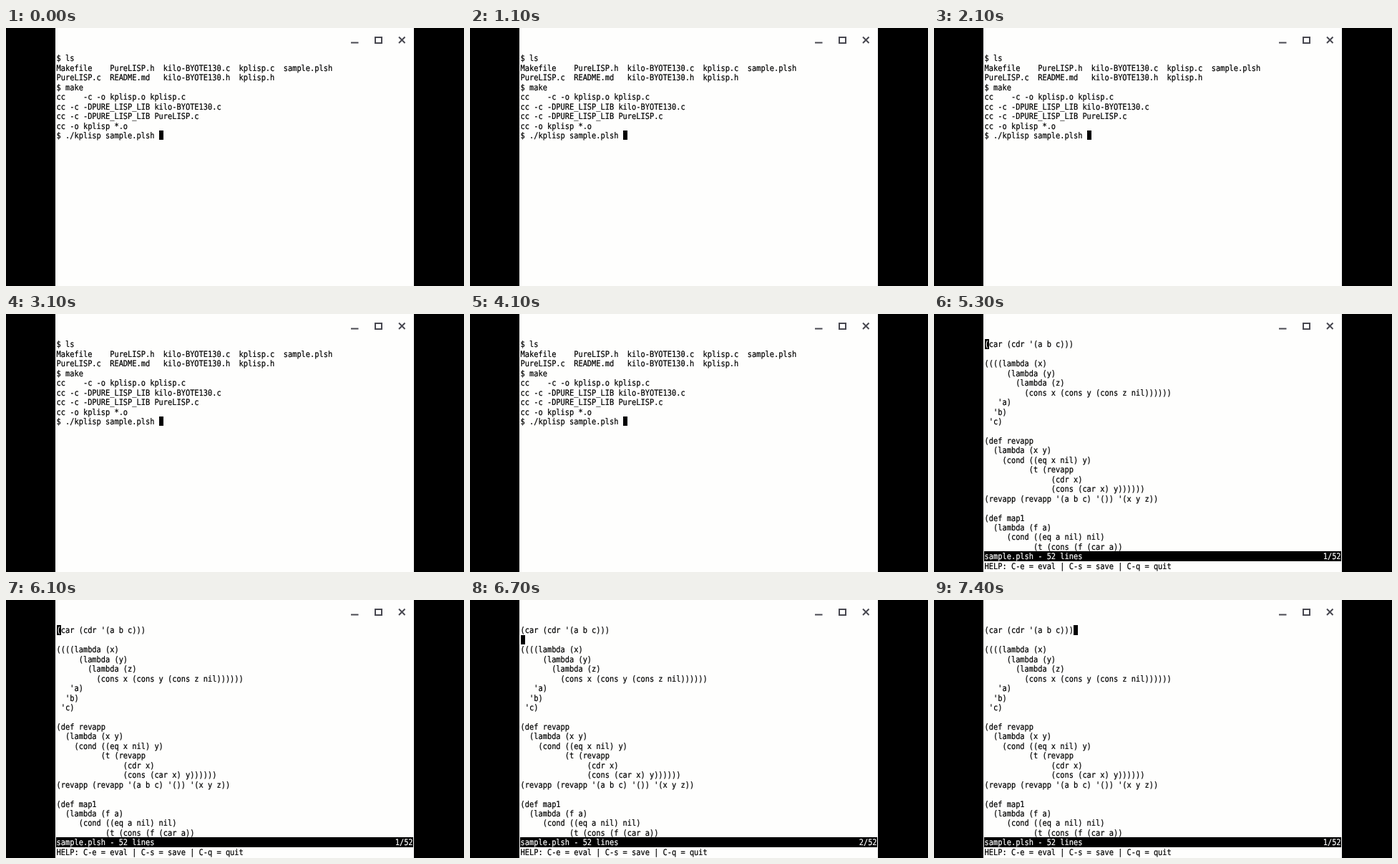
Recreate the animation shown at these times as an HTML page. Size 640 by 360 pixels, loop 8 s.

```html
<!DOCTYPE html>
<html lang="en">
<head>
<meta charset="utf-8">
<title>Terminal session</title>
<style>
  html, body { margin: 0; width: 100%; height: 100%; overflow: hidden; background: #000; }
  svg { display: block; width: 100vw; height: 100vh; }
  rect { shape-rendering: crispEdges; }
  text {
    font: 10.34px "DejaVu Sans Mono", monospace;
    white-space: pre;
    text-rendering: geometricPrecision;
    stroke-width: .2px;
  }
</style>
</head>
<body>
<svg id="stage" viewBox="0 0 640 360">
  <rect width="640" height="360"/>
  <rect x="69" width="501" height="360" fill="#fefefd"/>
  <g fill="none" stroke="#484850" stroke-width="2">
    <path d="M482 20.5h10.5"/>
    <rect x="516" y="12.5" width="8.5" height="8"/>
    <path d="M549 12.5l8.5 8.5m0-8.5l-8.5 8.5"/>
  </g>
</svg>
<script>
const LOOP = 8000;
const LEFT = 70.6, TOP = 35.2, CELL_W = 6.225, CELL_H = 13.45, BASELINE = 11.2;
const TALL = 1.13; // the terminal face is taller than the fallback one

const shell = String.raw`$ ls
Makefile    PureLISP.h  kilo-BYOTE130.c  kplisp.c  sample.plsh
PureLISP.c  README.md   kilo-BYOTE130.h  kplisp.h
$ make
cc    -c -o kplisp.o kplisp.c
cc -c -DPURE_LISP_LIB kilo-BYOTE130.c
cc -c -DPURE_LISP_LIB PureLISP.c
cc -o kplisp *.o
$ ./kplisp sample.plsh`.split("\n");

const buffer = String.raw`(car (cdr '(a b c)))

((((lambda (x)
     (lambda (y)
       (lambda (z)
         (cons x (cons y (cons z nil))))))
   'a)
  'b)
 'c)

(def revapp
  (lambda (x y)
    (cond ((eq x nil) y)
          (t (revapp
               (cdr x)
               (cons (car x) y))))))
(revapp (revapp '(a b c) '()) '(x y z))

(def map1
  (lambda (f a)
     (cond ((eq a nil) nil)
           (t (cons (f (car a))`.split("\n");

const STATUS_ROW = 22, HELP_ROW = 23, COLUMNS = 80;

// Each step holds until the next one starts.
const steps = [
  { at: 0, editor: false, row: 8, col: 23 },
  { at: 5300, editor: true, row: 0, col: 0 },
  { at: 6700, editor: true, row: 1, col: 0 },
  { at: 7100, editor: true, row: 0, col: 20 },
];

const stage = document.getElementById("stage");

function add(parent, tag, attrs = {}) {
  const node = document.createElementNS("http://www.w3.org/2000/svg", tag);
  for (const [key, value] of Object.entries(attrs)) node.setAttribute(key, value);
  return parent.appendChild(node);
}

const cellX = col => LEFT + col * CELL_W;
const cellY = row => TOP + row * CELL_H;

function place(node, row, col) {
  node.setAttribute("transform",
    `translate(${cellX(col)} ${cellY(row) + BASELINE}) scale(1 ${TALL})`);
}

function write(parent, string, row, col = 0, color = "#000") {
  const node = add(parent, "text", { fill: color, stroke: color });
  node.textContent = string;
  place(node, row, col);
  return node;
}

const shellView = add(stage, "g");
shell.forEach((line, row) => write(shellView, line, row));

const editorView = add(stage, "g");
buffer.forEach((line, row) => write(editorView, line, row));
add(editorView, "rect", { x: 70, y: cellY(STATUS_ROW), width: 499, height: CELL_H });
write(editorView, "sample.plsh - 52 lines", STATUS_ROW, 0, "#fff");
const position = write(editorView, "", STATUS_ROW, COLUMNS - 4, "#fff");
write(editorView, "HELP: C-e = eval | C-s = save | C-q = quit", HELP_ROW);

const cursor = add(stage, "rect", { width: CELL_W, height: CELL_H });
const underCursor = write(stage, "", 0, 0, "#fff");

function render(time) {
  const { editor, row, col } = steps.findLast(step => step.at <= time);
  shellView.style.display = editor ? "none" : "";
  editorView.style.display = editor ? "" : "none";
  position.textContent = `${row + 1}/52`;
  cursor.setAttribute("x", cellX(col));
  cursor.setAttribute("y", cellY(row));
  underCursor.textContent = (editor ? buffer : shell)[row][col] || "";
  place(underCursor, row, col);
}

const start = performance.now();
function tick() {
  render((performance.now() - start) % LOOP);
  requestAnimationFrame(tick);
}
tick();
</script>
</body>
</html>
```
